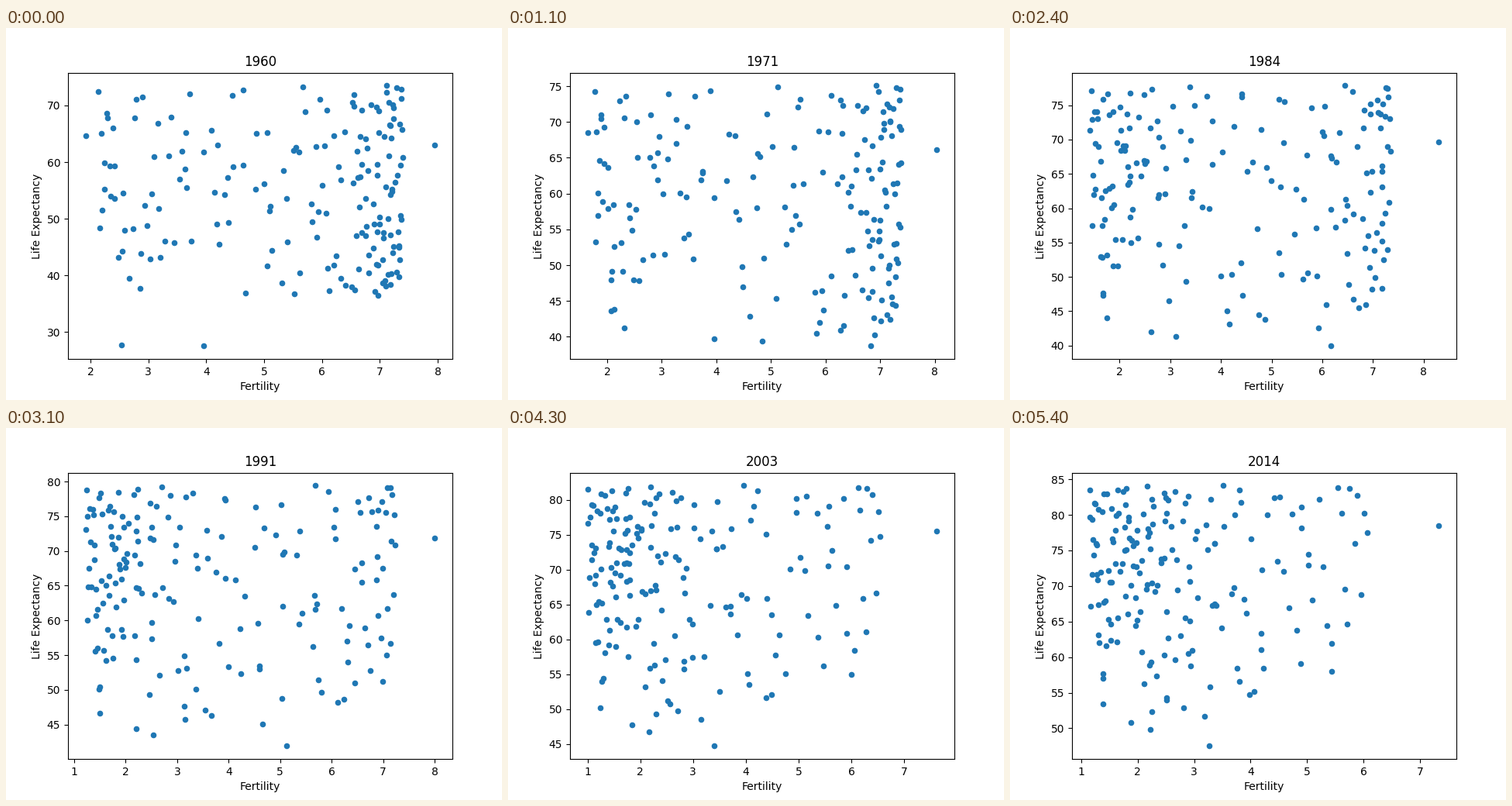
Recreate the animation shown at these times as a matplotlib script. Size 640 by 480 pixels, loop 5500 ms.

```python
import matplotlib.pyplot as plt
import numpy as np
from matplotlib.animation import FuncAnimation

FIRST, YEARS = 1960, 55
COUNT = 185

# Edges of the cloud at a few key years.
KEYS = [1960, 1966, 1975, 1984, 1998, 2008, 2014]
FERTILITY_MIN = [1.915, 1.84, 1.48, 1.404, 1.037, 0.964, 1.145]
FERTILITY_MAX = [7.95, 8.13, 7.97, 8.305, 7.704, 7.54, 7.336]
LIFE_MIN = [36.5, 37.2, 39.9, 39.93, 43.85, 45.52, 47.5]
LIFE_MAX = [73.5, 74.3, 75.7, 77.84, 81.0, 83.08, 84.1]

# Sudden falls in life expectancy: peak year, fertility, lowest value, width.
CRISES = [
    (1960, 3.99, 27.55, 1.5),
    (1960, 2.52, 27.8, 1.5),
    (1977, 4.48, 20, 4.2),
    (1994, 4.6, 10, 0.6),
    (2010, 3.4, 32.5, 0.5),
]

rng = np.random.default_rng(8)
rank_x = np.linspace(0, 1, COUNT)
rank_y = rng.permutation(rank_x)
phase = rng.uniform(0, 2 * np.pi, (2, COUNT))
speed = rng.uniform(.05, .15, (2, COUNT))


def wobble(axis, rank, year):
    """Slow personal drift that fades out at the edges of the cloud."""
    wave = np.sin(speed[axis] * (year - FIRST) + phase[axis])
    return 4 * rank * (1 - rank) * wave


def fertility(year):
    """Large families give way to small ones, rank by rank."""
    low, high = (np.interp(year, KEYS, k) for k in (FERTILITY_MIN, FERTILITY_MAX))
    t = (year - FIRST) / (YEARS - 1)
    middle = .3 + .63 * t * t * (3 - 2 * t)
    share = 1 / (1 + np.exp(-10 * (rank_x - middle)))
    small, large = low + 2.4 * rank_x, 6 + 1.4 * rank_x
    x = small + (large - small) * share + .15 * wobble(0, rank_x, year)
    x = np.clip(x, low, high)
    x[0], x[-1] = low, high
    return x


def life(year):
    """An even spread at first, later crowded towards the top."""
    low, high = (np.interp(year, KEYS, k) for k in (LIFE_MIN, LIFE_MAX))
    power = .5 + .5 * np.exp(-(year - FIRST) / 19)
    y = low + (high - low) * rank_y ** power + .8 * wobble(1, rank_y, year)
    y = np.clip(y, low, high)
    for who, (peak, _, lowest, width) in zip(struck, CRISES):
        y[who] += (lowest - y[who]) * np.exp(-((year - peak) / width) ** 2)
    return y


struck = [np.abs(fertility(peak) - x).argmin() for peak, x, _, _ in CRISES]

fig, ax = plt.subplots(figsize=(6.4, 4.8), dpi=100)


def draw(i):
    year = FIRST + i
    ax.clear()
    ax.scatter(fertility(year), life(year), s=20, color="#1f77b4")
    ax.set_title(str(year))
    ax.set_xlabel("Fertility")
    ax.set_ylabel("Life Expectancy")


anim = FuncAnimation(fig, draw, frames=YEARS, interval=100, repeat=True)
plt.show()
```
